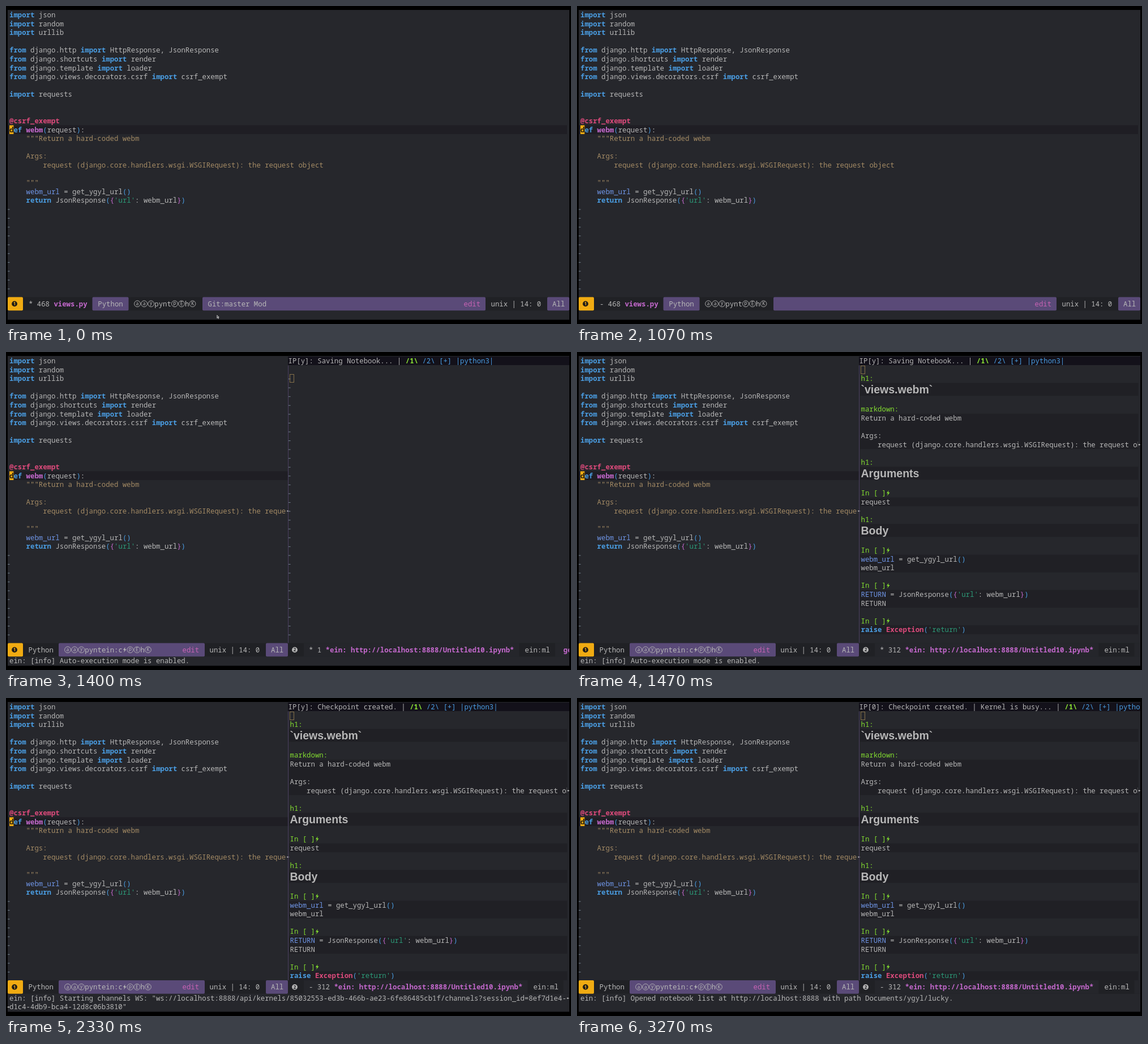
Recreate the animation shown at these times as an HTML page with a canvas. Size 998 px wide and 561 px high, loop 3.93 s.

```html
<!DOCTYPE html>
<html lang="en">
<head>
<meta charset="utf-8">
<title>Editor and notebook</title>
<style>
html, body { margin: 0; width: 100%; height: 100%; overflow: hidden; background: #000; }
canvas { display: block; }
</style>
</head>
<body>
<canvas id="stage" width="998" height="561"></canvas>
<script>
const ctx = document.getElementById('stage').getContext('2d');
const LOOP = 3930;
const SIZE = 12.34, CW = SIZE * 0.6, LH = 15.57, TOP = 8;
const MONO = '"Noto Sans Mono", "DejaVu Sans Mono", monospace';
const SANS = '"Liberation Sans", Arial, sans-serif';
const C = {
  bg: '#26272c', line: '#1f1e24', band: '#202025', bar: '#202125', purple: '#5a4a78',
  gold: '#f0ab12', text: '#b7b7b7', blue: '#4a9de2', dash: '#71808c', header: '#13111a'
};

// Markup: "~" plus a letter switches style.
const STYLES = {
  t: [C.text], k: [C.blue, 1], b: [C.blue], p: ['#dc4a7b', 1], f: ['#c368cc', 1],
  v: ['#6f95e6'], d: ['#a38a64'], s: ['#2c9a78'], m: ['#c368cc'], e: ['#c863b4'],
  g: ['#82dc30'], G: ['#8ae234', 1], x: ['#201c10', 1]
};

const CODE = [
  '~kimport~t json',
  '~kimport~t random',
  '~kimport~t urllib',
  '',
  '~kfrom~t django.http ~kimport~t HttpResponse, JsonResponse',
  '~kfrom~t django.shortcuts ~kimport~t render',
  '~kfrom~t django.template ~kimport~t loader',
  '~kfrom~t django.views.decorators.csrf ~kimport~t csrf_exempt',
  '',
  '~kimport~t requests',
  '', '',
  '~p@csrf_exempt',
  '~xd~kef ~fwebm~b(~trequest~b)~t:',
  '~d    """Return a hard-coded webm',
  '',
  '~d    Args:',
  '~d        request (django.core.handlers.wsgi.WSGIRequest): the request object',
  '',
  '~d    """',
  '~v    webm_url~t = get_ygyl_url~b()',
  "~k    return~t JsonResponse~b(~m{~s'url'~t: webm_url~m}~b)"
];

// Notebook cells: top of the label row, label, body lines or a heading.
const CELLS = [
  { y: 39, label: 'h1:', title: '`views.webm`' },
  { y: 93.3, label: 'markdown:', body: ['Return a hard-coded webm', '', 'Args:',
    '    request (django.core.handlers.wsgi.WSGIRequest): the request object'] },
  { y: 186.9, label: 'h1:', title: 'Arguments' },
  { y: 241, label: 'In [ ]⚡', body: ['request'] },
  { y: 287.8, label: 'h1:', title: 'Body' },
  { y: 342, label: 'In [ ]⚡', body: ['~vwebm_url~t = get_ygyl_url~b()', 'webm_url'] },
  { y: 404.3, label: 'In [ ]⚡',
    body: ["~vRETURN~t = JsonResponse~b(~m{~s'url'~t: webm_url~m}~b)", 'RETURN'] },
  { y: 466.6, label: 'In [ ]⚡', body: ["~kraise ~pException~b(~s'return'~b)"] }
];

const TABS = '| ~G/1\\~t ~b/2\\~t ~b[+]~t ~b|python3|';
const MINOR = 'ⓐⓐⓨpynt';
const WS = ['ein: [info] Starting channels WS: "ws://localhost:8888/api/kernels/' +
  '85032553-ed3b-466b-ae23-6fe86485cb1f/channels?session_id=8ef7d1e4-',
  'd1c4-4db9-bca4-12d8c06b3810"'];

// Each state inherits from the one before it.
const STEPS = [
  { at: 0, pointer: true, mark: '*', git: true, split: false, cells: false, echo: [], rows: 1 },
  { at: 870, pointer: false },
  { at: 930, mark: '-' },
  { at: 1070, git: false },
  { at: 1200, echo: ['ein: [info] Opening notebook Documents/ygyl/lucky/Untitled10.ipynb...'] },
  { at: 1400, split: true, book: '* 1', head: 'IP[y]: Saving Notebook... ' + TABS,
    echo: ['ein: [info] Auto-execution mode is enabled.'] },
  { at: 1470, cells: true, book: '* 312' },
  { at: 1530, echo: ['Mark set'] },
  { at: 2330, rows: 2, book: '- 312', head: 'IP[y]: Checkpoint created. ' + TABS, echo: WS },
  { at: 2600, echo: ['ein: [info] Opened notebook list at http://localhost:8888 with path Documents/ygyl/lucky.'] },
  { at: 3270, head: 'IP[0]: Checkpoint created. | Kernel is busy... ' + TABS }
];

const rowTop = r => TOP + r * LH;

function rect(x, y, w, h, color) {
  ctx.fillStyle = color;
  ctx.fillRect(x, y, w, h);
}

function clipped(x, y, w, h, draw) {
  ctx.save();
  ctx.beginPath();
  ctx.rect(x, y, w, h);
  ctx.clip();
  draw();
  ctx.restore();
}

function plain(s, x, y, color, bold) {
  ctx.font = (bold ? 'bold ' : '') + SIZE + 'px ' + MONO;
  ctx.fillStyle = color;
  ctx.fillText(s, x, y);
}

function ringed(ch, x, y, color) {
  ctx.strokeStyle = ctx.fillStyle = color;
  ctx.lineWidth = 0.9;
  ctx.beginPath();
  ctx.arc(x + 6, y - 4.3, 5.4, 0, 7);
  ctx.stroke();
  ctx.font = '8.5px "Noto Sans", sans-serif';
  ctx.textAlign = 'center';
  ctx.fillText(ch, x + 6, y - (/[yp]/.test(ch) ? 2.5 : 1.4));
  ctx.textAlign = 'left';
}

function polygon(points, x, y, color) {
  ctx.fillStyle = color;
  ctx.beginPath();
  points.forEach(([px, py]) => ctx.lineTo(x + px, y + py));
  ctx.fill();
}

function bolt(x, y, color) {
  polygon([[4.6, -9], [1, -3.8], [3.4, -3.8], [2, 0.6], [6.6, -5.4], [4, -5.4]], x, y, color);
}

function rich(s, x, y) {
  let style = STYLES.t;
  for (const part of s.split(/(~[a-zA-Z]|[ⓐ-ⓩⒶ-Ⓩ⚡])/)) {
    if (!part) continue;
    if (part[0] === '~') {
      style = STYLES[part[1]];
    } else if (part === '⚡') {
      bolt(x, y, style[0]);
      x += CW;
    } else if (/[ⓐ-ⓩⒶ-Ⓩ]/.test(part)) {
      ringed(part.normalize('NFKD'), x, y, style[0]);
      x += 12.1;
    } else {
      plain(part, x, y, style[0], style[1]);
      x += part.length * CW;
    }
  }
}

const row = (s, x, top) => rich(s, x, top + 12.1);

function dashes(x, from, to) {
  for (let r = from; r <= to; r++) rect(x, rowTop(r) + 7.9, 3.6, 1, C.dash);
}

function cut(x, top) {
  rect(x, top + 7.4, 4, 1, C.text);
  rect(x + 1, top + 6.6, 1.4, 2.6, C.text);
}

function disc(n, x, y, color, ink) {
  ctx.fillStyle = color;
  ctx.beginPath();
  ctx.arc(x, y, 4.9, 0, 7);
  ctx.fill();
  ctx.font = 'bold 8px "Noto Sans", sans-serif';
  ctx.textAlign = 'center';
  ctx.fillStyle = ink;
  ctx.fillText(n, x, y + 2.9);
  ctx.textAlign = 'left';
}

function segment(x0, x1, top, color) {
  ctx.fillStyle = color;
  ctx.beginPath();
  ctx.roundRect(x0, top, x1 - x0, 23.6, 2);
  ctx.fill();
}

function drawCode(s, limit) {
  const edge = s.split ? 498 : 995;
  rect(3, rowTop(13), (s.split ? 498 : 991) - 3, LH, C.line);
  rect(6, rowTop(13), CW, LH, C.gold);
  clipped(3, TOP, (s.split ? 495.5 : edge) - 3, limit - TOP, () =>
    CODE.forEach((line, i) => row(line, 6, rowTop(i))));
  dashes(3, 22, s.rows > 1 ? 30 : 31);
  if (s.split) cut(496, rowTop(17));
}

function drawCell({ y, label, title, body }) {
  row('~g' + label, 501.5, y);
  const top = y + LH;
  rect(500, top, 491.5, title ? 22.8 : body.length * LH, C.band);
  if (title) {
    ctx.font = 'bold 19.5px ' + SANS;
    ctx.fillStyle = C.text;
    ctx.fillText(title, 501.5, top + 18.3);
  } else {
    clipped(499, top, 492, 100, () =>
      body.forEach((line, i) => row(line, 501.5, top + i * LH)));
  }
}

function drawNotebook(s, limit) {
  rect(498, TOP, 497, LH - 0.5, C.header);
  clipped(498, TOP, 497, LH, () => row(s.head, 498.5, TOP));
  clipped(498, TOP, 497, limit - TOP, () => {
    if (s.cells) {
      CELLS.forEach(drawCell);
      cut(991.5, 155.6);
    } else {
      dashes(499, 2, 31);
    }
  });
  ctx.strokeStyle = '#85704a';
  ctx.lineWidth = 1;
  ctx.strokeRect(501.5, Math.round(rowTop(s.cells ? 1 : 2)) + 0.5, 7, 14);
  rect(498, TOP + LH, 1, limit - TOP - LH, '#4a4060');
}

function drawBar(s, top) {
  const y = top + 16;
  const put = (text, x) => rich(text, x, y);
  const end = s.split ? 498 : 995;
  rect(3, top, end - 3, 23.6, C.bar);
  segment(3, 30, top, C.gold);
  disc('1', 15, top + 11.8, '#211d18', C.gold);
  if (s.split) {
    put('Python', 39.5);
    segment(93, 351, top, C.purple);
    put(MINOR + 'ein:c⚡ⓟⒺhⓀ', 103);
  } else {
    put(s.mark + ' 468 ~fviews.py', 40);
    segment(152.5, 216.5, top, C.purple);
    put('Python', 162.3);
    put(MINOR + 'ⓟⒺhⓀ', 226);
    segment(347, 847, top, C.purple);
    if (s.git) put('Git:master Mod', 356.5);
  }
  put('~eedit', end - 186.5);
  put('unix | 14: 0', end - 138.5);
  segment(end - 39, end, top, C.purple);
  put('All', end - 30);

  if (!s.split) return;
  rect(498, top, 497, 23.6, C.bar);
  rect(526, top, 469, 23.6, '#25262b');
  disc('2', 510, top + 11.8, C.text, C.bar);
  const name = 535 + (s.book.length + 1) * CW;
  put(s.book, 535);
  put('~f*ein: http://localhost:8888/Untitled10.ipynb*', name);
  rect(name + 342, top, Math.min(63, 653 - name), 23.6, C.bar);
  clipped(498, top, 497, 24, () => {
    put('ein:ml', name + 352);
    if (!s.cells) put('~fge', 984.5);
  });
}

function drawEcho(s) {
  s.echo.forEach((line, i) => {
    const top = rowTop(35 - s.rows + i);
    clipped(3, top, 992, LH + 1, () => row(line, 6, top));
  });
  if (s.echo === WS) {
    cut(990.5, rowTop(33));
    cut(2.5, rowTop(34));
  }
}

function drawPointer() {
  polygon([[0, 0], [0, 6.2], [1.5, 4.9], [2.6, 7], [3.6, 6.5], [2.7, 4.5], [4.6, 4.3]],
    372.4, 545, '#d0d0d0');
  polygon([[0.8, 1.8], [0.8, 4.3], [2.6, 3.8]], 372.4, 545, '#26272c');
}

function draw(s) {
  rect(0, 0, 998, 561, '#000');
  rect(3, 7, 992, 546.5, C.bg);
  const top = rowTop(34 - s.rows) - 8.2;
  drawCode(s, top);
  if (s.split) drawNotebook(s, top);
  drawBar(s, top);
  drawEcho(s);
  if (s.pointer) drawPointer();
}

const states = [];
STEPS.forEach((step, i) => states.push({ ...states[i - 1], ...step }));

const start = performance.now();
function tick() {
  const t = (performance.now() - start) % LOOP;
  draw(states.filter(s => s.at <= t).pop());
  requestAnimationFrame(tick);
}
tick();
</script>
</body>
</html>
```
